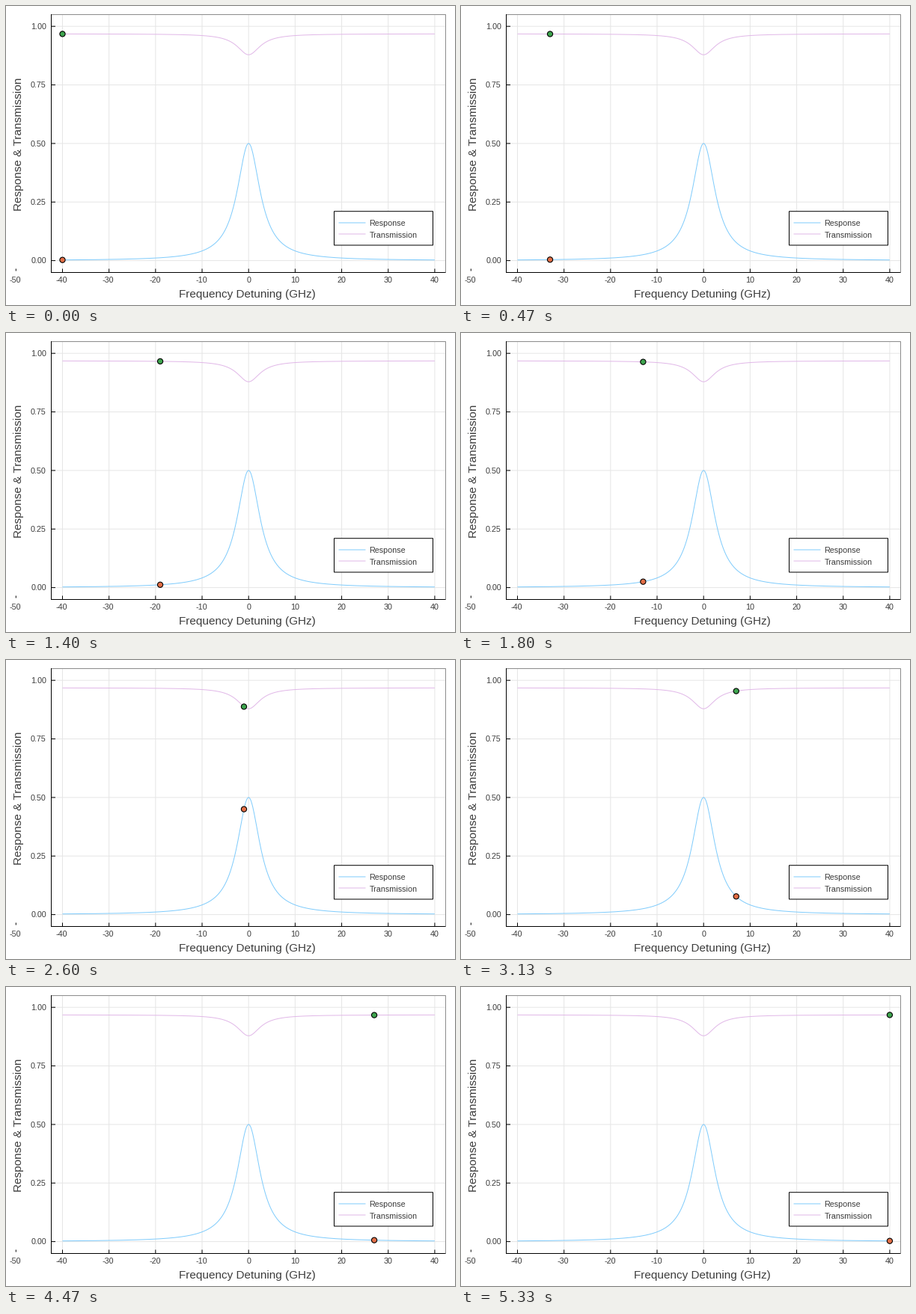
These frames come from a looping animation (600 px wide and 400 px high, 5.39 s). A matplotlib script:

```python
import numpy as np
import matplotlib.pyplot as plt
from matplotlib.animation import FuncAnimation
from matplotlib.patches import Circle, Rectangle

W, H, DPI = 600, 400, 100
PT = 72 / DPI  # points per pixel
LEFT, RIGHT, TOP, BOTTOM = 60.5, 587.5, 11.5, 356.5
BLUE, PURPLE = "#80ccfc", "#e1b8e8"
ORANGE, GREEN = "#e36f47", "#3ea44e"
INK = "#3c3c3c"

plt.rcParams["font.family"] = "Liberation Sans"
fig = plt.figure(figsize=(W / DPI, H / DPI), dpi=DPI, facecolor="white")
ax = fig.add_axes([0, 0, 1, 1])
ax.set_xlim(0, W)
ax.set_ylim(H, 0)
ax.axis("off")


def px(detuning):
    return 324.2 + 6.218 * detuning


def py(value):
    return 340.6 - 313.4 * value


def lorentz(detuning, width=3.0):
    return width**2 / (detuning**2 + width**2)


def response(detuning):
    return 0.5 * lorentz(detuning)


def transmission(detuning):
    return 0.968 - 0.0893 * lorentz(detuning)


def line(x, y, color="black", **kw):
    ax.plot(x, y, color=color, lw=PT, solid_capstyle="butt", snap=False, **kw)


def label(x, y, text, size=10.7, **kw):
    ax.text(x, y, text, fontsize=size * PT, color=INK, va="baseline", **kw)


# Grid, frame and ticks
x_ticks = range(-40, 41, 10)
y_ticks = [0, 0.25, 0.5, 0.75, 1]
for d in x_ticks:
    line([px(d)] * 2, [TOP, BOTTOM], "#e6e6e6")
for v in y_ticks:
    line([LEFT, RIGHT], [py(v)] * 2, "#e6e6e6")

line([LEFT, RIGHT, RIGHT], [TOP, TOP, BOTTOM], "#8c8c8c")
line([LEFT, LEFT], [TOP - 0.5, BOTTOM + 0.5])
line([LEFT, RIGHT], [BOTTOM, BOTTOM])

for d in (-50, *x_ticks):
    line([px(d)] * 2, [351.5, BOTTOM if d >= -40 else 354.5])
    label(px(d) - (1 if d < 0 else 0), 370, str(d), ha="center")
for v in y_ticks:
    line([LEFT, 66], [py(v)] * 2)
    label(53.8, py(v) + 3.8, f"{v:.2f}", ha="right")

label(322, 390, "Frequency Detuning (GHz)", 15.3, ha="center")
label(21.5, 184.5, "Response & Transmission", 15.4, ha="center",
      rotation=90, rotation_mode="anchor")

# Curves
detuning = np.linspace(-40, 40, 801)
curves = [(response, BLUE, ORANGE), (transmission, PURPLE, GREEN)]
for curve, color, _ in curves:
    line(px(detuning), py(curve(detuning)), color)

# Legend
ax.add_patch(Rectangle((438.5, 274.7), 132, 45.3, fc="white", ec="black",
                       lw=PT, snap=False, zorder=3))
for y, color, name in [(290, BLUE, "Response"), (305, PURPLE, "Transmission")]:
    line([444.5, 480.5], [y, y], color, zorder=4)
    label(485.5, y + 4.5, name, 10.7, zorder=4)

dots = [
    ax.add_patch(Circle((0, 0), 3.6, fc=fill, ec="black", lw=1.1 * PT, zorder=5))
    for _, _, fill in curves
]

LOOP, INTERVAL = 5390, 22


def update(frame):
    # The dots step 1 GHz fifteen times a second, on a 10 ms clock.
    tick = (INTERVAL * (frame + 1) - 1) // 10
    d = min((6 * tick + 3) // 40, 80) - 40
    for dot, (curve, _, _) in zip(dots, curves):
        dot.center = px(d), py(curve(d))
    return dots


anim = FuncAnimation(fig, update, frames=LOOP // INTERVAL, interval=INTERVAL,
                     init_func=lambda: update(0), repeat=True, repeat_delay=0)
plt.show()
```
